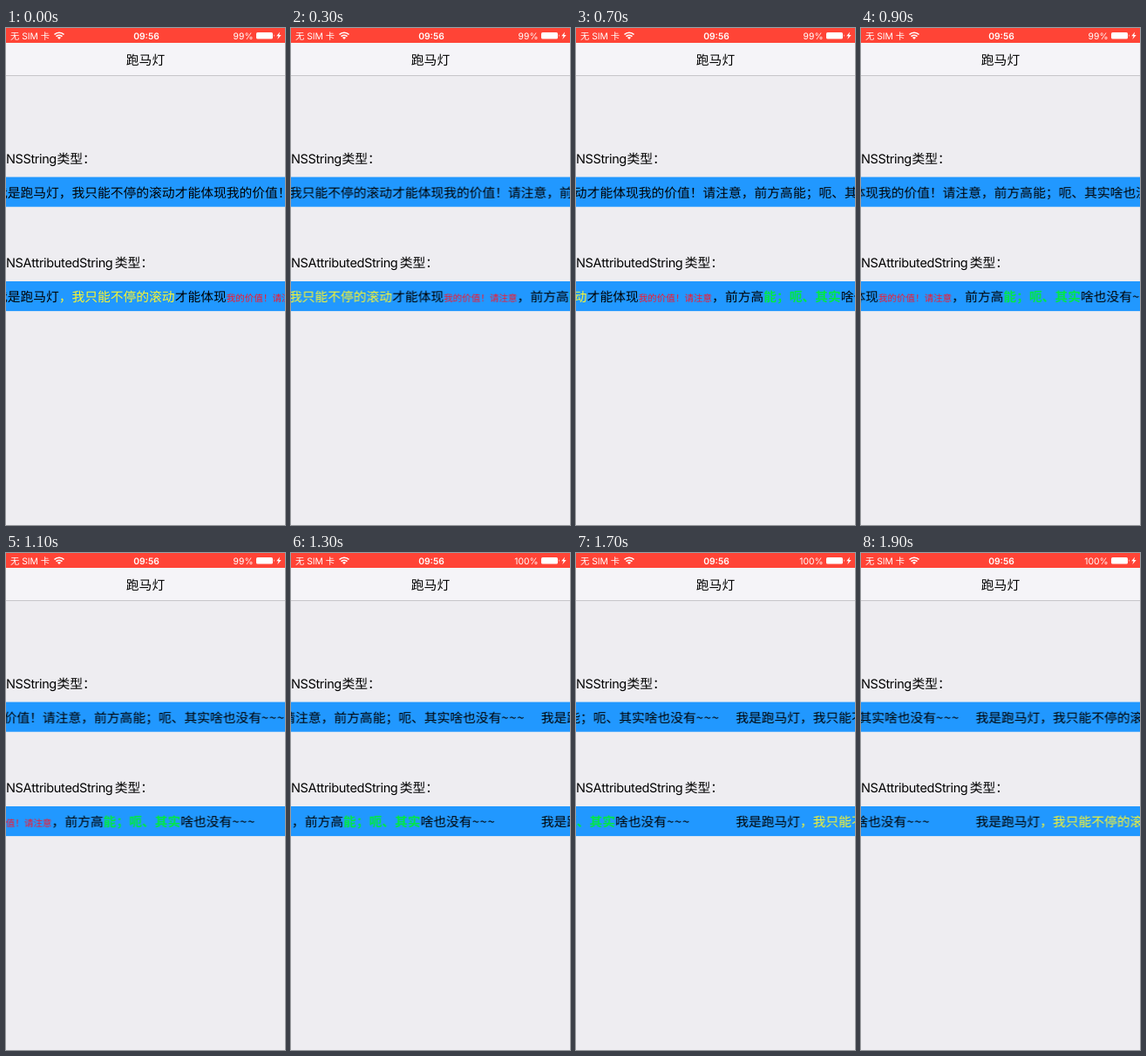
An HTML page for the animation above (2 s loop, 320x569 px).

```html
<!DOCTYPE html>
<html lang="zh-CN">
<head>
<meta charset="utf-8">
<title>跑马灯</title>
<style>
  html, body { margin: 0; width: 100%; height: 100%; overflow: hidden; background: #eeedf1; }
  svg { display: block; width: 320px; height: 569px; }
  text {
    font-family: "Noto Sans CJK SC", "Noto Sans CJK", sans-serif;
    font-size: 14.78px;
    font-kerning: none;
    text-rendering: geometricPrecision;
    white-space: pre;
  }
  .title { font-weight: 500; text-anchor: middle; }
  .latin { font-family: Inter, "Noto Sans CJK SC", sans-serif; font-size: 14.5px; letter-spacing: -.35px; }
  .status text { font-family: Inter, "Noto Sans CJK SC", sans-serif; font-size: 10.3px; fill: #fff; }
  .status .clock { font-weight: 600; text-anchor: middle; }
  .status .level { text-anchor: end; }
  .yellow { fill: #fcf62c; }
  .red { fill: #ff1424; font-size: 10.55px; }
  .green { fill: #00ea40; font-weight: 600; }
  .wave { letter-spacing: .8px; }

  .marquee { animation: scroll 2s steps(20, end) infinite; }
  .before { animation: before 2s step-end infinite; }
  .after { animation: after 2s step-end infinite; }
  @keyframes scroll { to { transform: translateX(-517.4px); } }
  @keyframes before { 0% { opacity: 1; } 65%, 100% { opacity: 0; } }
  @keyframes after { 0% { opacity: 0; } 65%, 100% { opacity: 1; } }
</style>
</head>
<body>
<svg viewBox="0 0 320 569">
  <rect width="320" height="569" fill="#eeedf1"/>
  <rect y="17" width="320" height="37" fill="#f5f4f8"/>
  <rect y="54" width="320" height="1" fill="#c6c5ca"/>
  <rect width="320" height="17" fill="#ff4436"/>

  <g class="status">
    <text x="5" y="12.6">无 SIM 卡</text>
    <g fill="none" stroke="#fff" stroke-width="1.7">
      <path d="M55.5 7.5a7.8 7.8 0 0 1 11 0M57.5 9.7a5 5 0 0 1 7 0"/>
      <path d="M61 13l-2-2.1a2.9 2.9 0 0 1 4 0z" fill="#fff" stroke="none"/>
    </g>
    <text class="clock" x="161" y="12.5">09:56</text>
    <text class="level before" x="283.5" y="12.5">99%</text>
    <text class="level after" x="283.5" y="12.5">100%</text>
    <g fill="#fff">
      <rect x="287" y="5" width="19" height="7.5" rx="1.6"/>
      <path d="M307 7.3q1.4 1.4 0 2.8zM314.2 4.6l-4 4.6h2.4l-1.3 3.8 4.4-5h-2.5z"/>
    </g>
  </g>

  <text class="title" x="160" y="41.6">跑马灯</text>

  <text class="latin" x="0" y="154.6">NSString</text>
  <text x="58.5" y="154.8">类型：</text>
  <text class="latin" x="0" y="273.9">NSAttributedString</text>
  <text x="124.8" y="274.1">类型：</text>

  <g fill="#2198ff">
    <rect y="170.6" width="320" height="34.1"/>
    <rect y="290" width="320" height="34.1"/>
  </g>
  <g class="marquee" id="marquee"></g>
</svg>
<script>
  const START = -13.1, PERIOD = 636;
  const rows = [
    { y: 193.5, parts: [['我是跑马灯，我只能不停的滚动才能体现我的价值！请注意，前方高能；呃、其实啥也没有']] },
    { y: 313, parts: [
      ['我是跑马灯'],
      ['，我只能不停的滚动', 'yellow'],
      ['才能体现'],
      ['我的价值！请注意', 'red'],
      ['，前方高'],
      ['能；呃、其实', 'green'],
      ['啥也没有']
    ] }
  ];
  const span = ([text, style = '']) => `<tspan class="${style}">${text}</tspan>`;
  const line = ({ y, parts }, x) =>
    `<text x="${x}" y="${y}">${[...parts, ['~~~', 'wave']].map(span).join('')}</text>`;

  document.getElementById('marquee').innerHTML =
    rows.map(row => line(row, START) + line(row, START + PERIOD)).join('');
</script>
</body>
</html>
```
